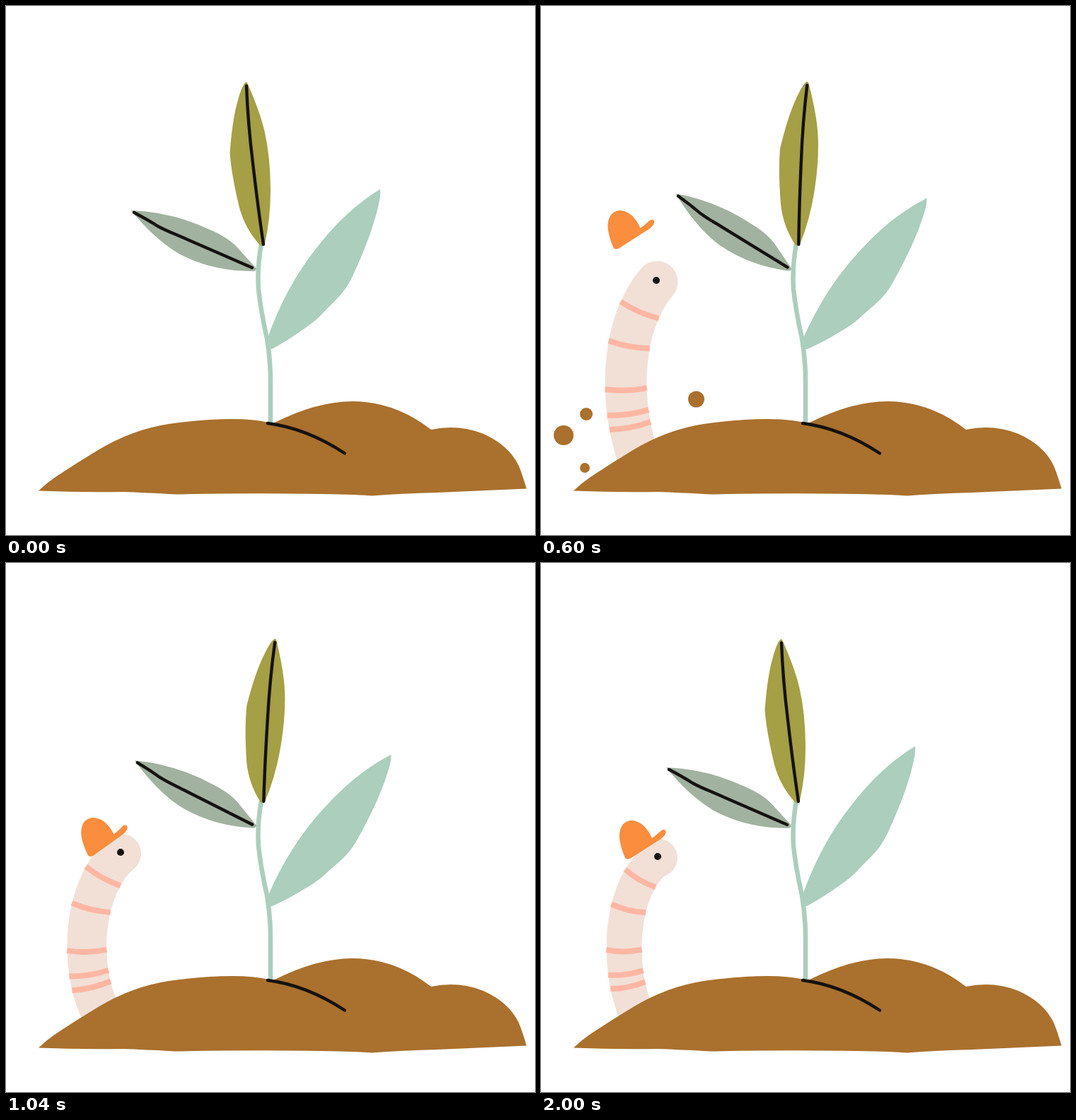
Animation of 748x748 px, one loop 2880 ms. Source, as an HTML page:

```html
<!DOCTYPE html>
<html lang="en">
<head>
<meta charset="utf-8">
<title>Worm and sprout</title>
<style>
  html, body { margin: 0; width: 100%; height: 100%; overflow: hidden; background: #fff; }
  svg { display: block; width: 100%; height: 100%; }
  .vein { fill: none; stroke: #15120f; stroke-width: 4.4; stroke-linecap: round; stroke-linejoin: round; }
</style>
</head>
<body>
<svg viewBox="0 0 748 748">
  <clipPath id="above"><path d="M0 0H748V662H0Z"/></clipPath>

  <g clip-path="url(#above)">
    <g id="worm">
      <path id="body" fill="none" stroke="#f2e0d7" stroke-linecap="round"/>
      <circle id="head" r="27" fill="#f2e0d7"/>
      <path id="stripes" fill="none" stroke="#ffb6a2" stroke-width="8"/>
      <ellipse id="eye" rx="5" fill="#15120f"/>
      <path id="hat" fill="#fa8d3e" d="M0 0C-4 -9 -9 -24 -8 -34Q-6 -52 9 -53Q27 -52 38 -28Q44 -32 49 -37Q54 -42 57 -39Q59 -36 55 -31Q52 -27 46 -24L7 1Q2 3 0 0Z"/>
    </g>
  </g>
  <g id="crumbs" fill="#aa702d"></g>

  <path fill="#aa702d" d="M46 685.5Q58 674 70 666Q100 646 130 628Q178 599 230 591Q280 584 320 584Q350 584 372 589L380 589Q440 559 490 559Q550 559 601 599Q640 591 675 605Q711 621 725 650Q730 662 736 682.5L610 688Q560 689 518 692.500L490 691Q380 688 240 690.500Q195 688 165 687Q105 688 46 685.500Z"/>
  <path fill="none" stroke="#abcebd" stroke-width="6.5" d="M374 589V530Q374 500 369 470Q360 430 357 400Q355 370 361 336"/>
  <path class="vein" d="M370 590Q425 597 479 632.500"/>

  <path id="teal" fill="#abcebd" d="M369 472Q395 397 440 341Q480 289 529 259Q530 268 527 280Q518 322 490 382Q482 400 466 416L452 430Q440 444 422 456Q400 472 378 484Q372 487 368 482Z"/>
  <g id="gray">
    <path fill="#a2b2a0" d="M177 289Q235 291 290 317Q318 329 332 347L354 371Q354 375 348 375Q290 375 244 350Q208 328 177 289Z"/>
    <path class="vein" d="M181 292Q200 302 214 311Q225 317 240 323L348 370"/>
  </g>
  <g id="green">
    <path fill="#a59f45" d="M339 108Q341 107 343 113Q360 152 366 179Q374 215 374 262Q374 300 366 336Q363 342 359 338Q338 315 330 285Q319 240 316.500 208Q320 160 328 133Q334 111 339 108Z"/>
    <path class="vein" d="M340 113Q342 165 349 222Q356 283 364 337"/>
  </g>
</svg>
<script>
const LOOP = 2880, STEP = 40;
const $ = id => document.getElementById(id);
const clamp = (v, lo = 0, hi = 1) => Math.min(hi, Math.max(lo, v));
const ease = u => u * u * (3 - 2 * u);
const part = (t, from, to) => clamp((t - from) / (to - from));

// Each pose: time, spine as a cubic from base to head, thickness, hat tilt.
const poses = [
  [360, 150, 650, 92, 400, 225, 400, 216, 620, 61, 120],  // arched over
  [600, 138, 640, 110, 557, 112, 453, 164, 390, 59, 0],   // sprung up
  [760, 140, 640, 109, 610, 125, 440, 189, 454, 65, 40],  // ducked
  [1040, 136, 640, 99, 568, 110, 455, 163, 411, 56, -3],  // leaning back
  [1280, 136, 640, 104, 566, 113, 455, 166, 417, 50, 0]   // at rest
];
// Places of the stripes along the spine, 0 at the base.
const bands = [[360, 0.89, 0.8, 0.38, 0.22, 0.1], [600, 0.81, 0.61, 0.375, 0.25, 0.18]];

const leaves = [
  { id: 'green', pivot: '364 339', peak: 13, top: 900, rise: 0.4, fall: 1.75 },
  { id: 'gray', pivot: '353 373', peak: 10, top: 740, rise: 0.6, fall: 1.2 },
  { id: 'teal', pivot: '371 484', peak: 11.7, top: 760, rise: 2.3, fall: 1.2 }
];

// x, y, radius at full spread
const crumbs = [[219.5, 556, 11.5], [64, 577, 9], [32, 607, 14], [62, 653, 7]];
const dots = crumbs.map(() => $('crumbs').appendChild(
  document.createElementNS('http://www.w3.org/2000/svg', 'circle')));

function set(el, attrs) {
  for (const k in attrs) el.setAttribute(k, attrs[k]);
}

// Eased values between the two rows around t.
function at(rows, t) {
  const n = rows.findIndex(r => r[0] > t);
  const b = rows.at(n), a = n < 1 ? b : rows[n - 1];
  const u = n < 1 ? 0 : ease(part(t, a[0], b[0]));
  return a.slice(1).map((v, i) => v + (b[i + 1] - v) * u);
}

// Point and unit direction on the spine.
function along(spine, u) {
  const v = 1 - u;
  const [p, d] = [
    [v * v * v, 3 * v * v * u, 3 * v * u * u, u * u * u],
    [-v * v, v * v - 2 * u * v, 2 * u * v - u * u, u * u]
  ].map(w => [0, 1].map(axis => w.reduce((sum, k, i) => sum + k * spine[2 * i + axis], 0)));
  const len = Math.hypot(...d);
  return [...p, d[0] / len, d[1] / len];
}

function drawWorm(t) {
  const pose = at(poses, t), spine = pose.slice(0, 8), [thick, tilt] = pose.slice(8);
  const half = thick / 2, [hx, hy] = spine.slice(6);
  set($('worm'), { transform: `translate(0 ${190 * (1 - ease(part(t, 160, 360)))})` });
  set($('body'), { d: `M${spine.slice(0, 2)}C${spine.slice(2)}`, 'stroke-width': thick });
  set($('head'), { cx: hx, cy: hy });

  // Stripes run from edge to edge and sag towards the base.
  set($('stripes'), { d: at(bands, t).map(u => {
    const [x, y, dx, dy] = along(spine, u);
    return `M${x + dy * half} ${y - dx * half}Q${x - dx * 5} ${y - dy * 5} ${x - dy * half} ${y + dx * half}`;
  }).join('') });

  // The eye squints on landing and blinks later, on a slower beat.
  const beat = Math.floor(t / 80) * 80;
  const lid = clamp(Math.min(Math.abs(beat - 760), Math.abs(beat - 1840)) / 160, 0.25);
  set($('eye'), { cx: hx - 1, cy: hy - 2, ry: 5 * lid });

  const toss = 48 * Math.sin(Math.PI * part(t, 480, 720));
  set($('hat'), { transform: `translate(${hx - 0.3 * toss} ${hy - toss}) rotate(${tilt}) translate(-47 0)` });
}

function drawLeaf({ id, pivot, peak, top, rise, fall }, t) {
  const up = ease(part(t, 360, top)) ** rise;
  const down = (1 - part(t, top, 1440) ** fall) ** 2.5;
  set($(id), { transform: `rotate(${peak * up * down} ${pivot})` });
}

// Crumbs burst out of the soil, then drop and shrink.
function drawCrumbs(t) {
  const out = Math.sin(Math.PI / 2 * part(t, 480, 600)), fall = part(t, 600, 760);
  crumbs.forEach(([x, y, r], i) => set(dots[i], {
    cx: 140 + (x - 140) * out,
    cy: 640 + (y - 640) * out + 35 * fall * fall,
    r: r * (1 - fall)
  }));
}

function tick(now) {
  const t = Math.floor(now % LOOP / STEP) * STEP;
  drawWorm(t);
  leaves.forEach(leaf => drawLeaf(leaf, t));
  drawCrumbs(t);
  requestAnimationFrame(tick);
}
tick(performance.now());
</script>
</body>
</html>
```
